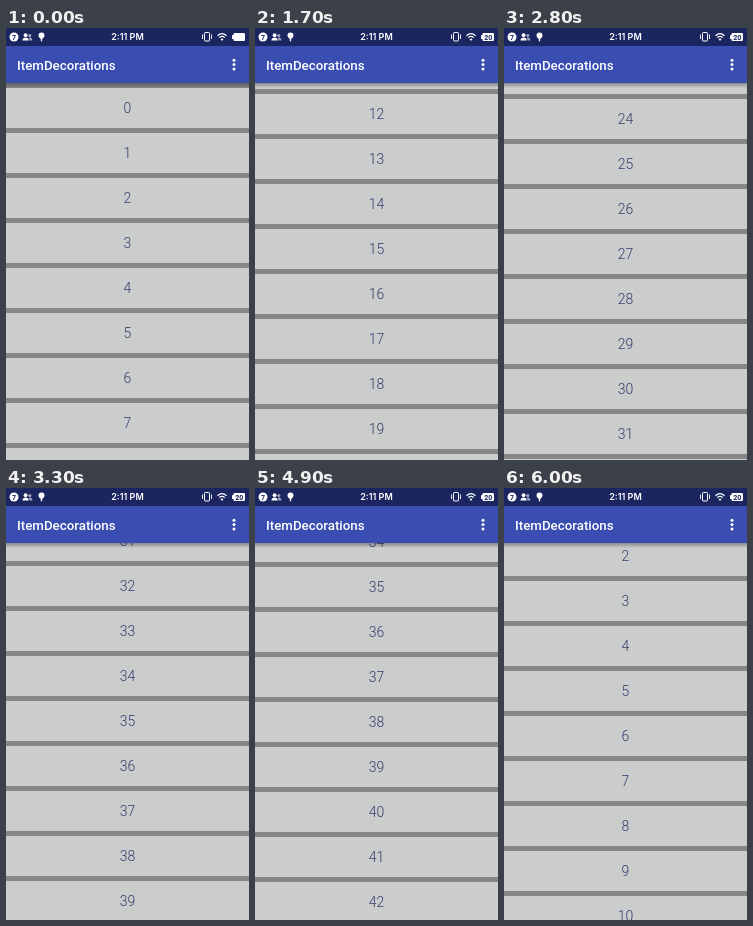
These frames come from a looping animation (243x432 px, 6100 ms). An HTML page:

```html
<!DOCTYPE html>
<html lang="en">
<head>
<meta charset="utf-8">
<title>ItemDecorations</title>
<style>
html, body { margin: 0; width: 100%; height: 100%; overflow: hidden; }
#stage { position: relative; width: 243px; height: 432px; overflow: hidden; background: #878787; }
#list { position: absolute; top: 60px; left: 0; width: 100%; will-change: transform; }
.row {
  height: 40px; margin-bottom: 5px; background: #cbcdcc; color: #343b6c;
  font: 300 14px/41px Roboto, sans-serif; text-align: center;
}
#bar { position: absolute; inset: 0 0 auto; height: 55px; background: #3a4db0; }
#bar::after {
  content: ""; position: absolute; top: 55px; left: 0; width: 100%; height: 5px;
  background: linear-gradient(rgba(0, 0, 0, .32), rgba(0, 0, 0, 0));
}
#bar svg { position: absolute; inset: 0; }
</style>
</head>
<body>
<div id="stage">
  <div id="list"></div>
  <div id="bar">
    <svg width="243" height="55" fill="#fff">
      <rect width="243" height="18" fill="#1b2661"/>
      <circle cx="8" cy="9" r="4.5"/>
      <text x="8" y="11.6" font-family="Roboto, sans-serif" font-size="7" font-weight="700" text-anchor="middle" fill="#1b2661">7</text>
      <g>
        <circle cx="19.6" cy="7.2" r="1.9"/>
        <path d="M16.4 12.6c0-4 6.4-4 6.4 0z"/>
        <g opacity=".6"><circle cx="23.8" cy="7.4" r="1.5"/><path d="M23.5 12.6c0-1.300-.3-2-.9-2.700 1.600-.9 3.800.1 3.800 2.700z"/></g>
      </g>
      <path d="M35.500 4.500a3 3 0 0 1 3 3c0 1.600-1.300 2.600-2.300 3.500v2.300h-1.400V11c-1-.9-2.300-1.900-2.300-3.500a3 3 0 0 1 3-3z"/>
      <text x="121.500" y="12.300" font-family="Inter, sans-serif" font-size="9" font-weight="600" text-anchor="middle">2:11 PM</text>
      <g fill="none" stroke="#fff">
        <rect x="198.500" y="4.500" width="5" height="8.500" rx=".8"/>
        <path d="M196.500 6.500v4.500M205.500 6.500v4.500" stroke-width=".9"/>
        <path d="M211.500 7.700q4.500-4 9 0M213.200 9.600q2.800-2.500 5.600 0" stroke-width="1.200"/>
      </g>
      <path d="M214.500 11q1.500-1.200 3 0l-1.500 2z"/>
      <rect x="226" y="7" width="2" height="4" rx=".6"/>
      <rect x="227.500" y="5" width="11.500" height="8" rx="1.200"/>
      <text id="charge" x="233.200" y="11.500" font-family="Roboto, sans-serif" font-size="7" font-weight="700" text-anchor="middle" fill="#1b2661">20</text>
      <text x="11" y="41.700" font-family="Roboto, sans-serif" font-size="13.300" font-weight="500">ItemDecorations</text>
      <circle cx="228" cy="32.300" r="1.500"/>
      <circle cx="228" cy="36.600" r="1.500"/>
      <circle cx="228" cy="40.900" r="1.500"/>
    </svg>
  </div>
</div>
<script>
const LOOP = 6100, STEP = 100;
// [time in ms, scroll offset in px]
const stops = [[0, 0], [800, 221], [1700, 534], [2400, 807], [3300, 1422],
               [4200, 1850], [4900, 1556], [6000, 102]];

const list = document.getElementById("list");
const charge = document.getElementById("charge");
for (let i = 0; i < 55; i++) {
  const row = document.createElement("div");
  row.className = "row";
  row.textContent = i;
  list.append(row);
}

const slope = i => (stops[i + 1][1] - stops[i][1]) / (stops[i + 1][0] - stops[i][0]);

// Harmonic mean of neighbouring slopes: no overshoot, rest at the turning point.
function tangent(i) {
  const last = stops.length - 1;
  if (i === 0) return slope(0);
  if (i === last) return slope(last - 1);
  const a = slope(i - 1), b = slope(i);
  return a * b > 0 ? 2 * a * b / (a + b) : 0;
}

function scrollAt(t) {
  let i = 0;
  while (i < stops.length - 2 && t > stops[i + 1][0]) i++;
  const [t0, y0] = stops[i], [t1, y1] = stops[i + 1];
  const h = t1 - t0, u = (t - t0) / h, v = 1 - u;
  return v * v * (1 + 2 * u) * y0 + u * u * (3 - 2 * u) * y1
    + h * u * v * (v * tangent(i) - u * tangent(i + 1));
}

const start = performance.now();
function draw() {
  const elapsed = Math.max(0, performance.now() - start) % LOOP;
  const t = Math.floor(elapsed / STEP) * STEP;
  list.style.transform = `translateY(${-Math.round(scrollAt(t))}px)`;
  charge.style.visibility = t ? "visible" : "hidden";
  requestAnimationFrame(draw);
}
draw();
</script>
</body>
</html>
```
